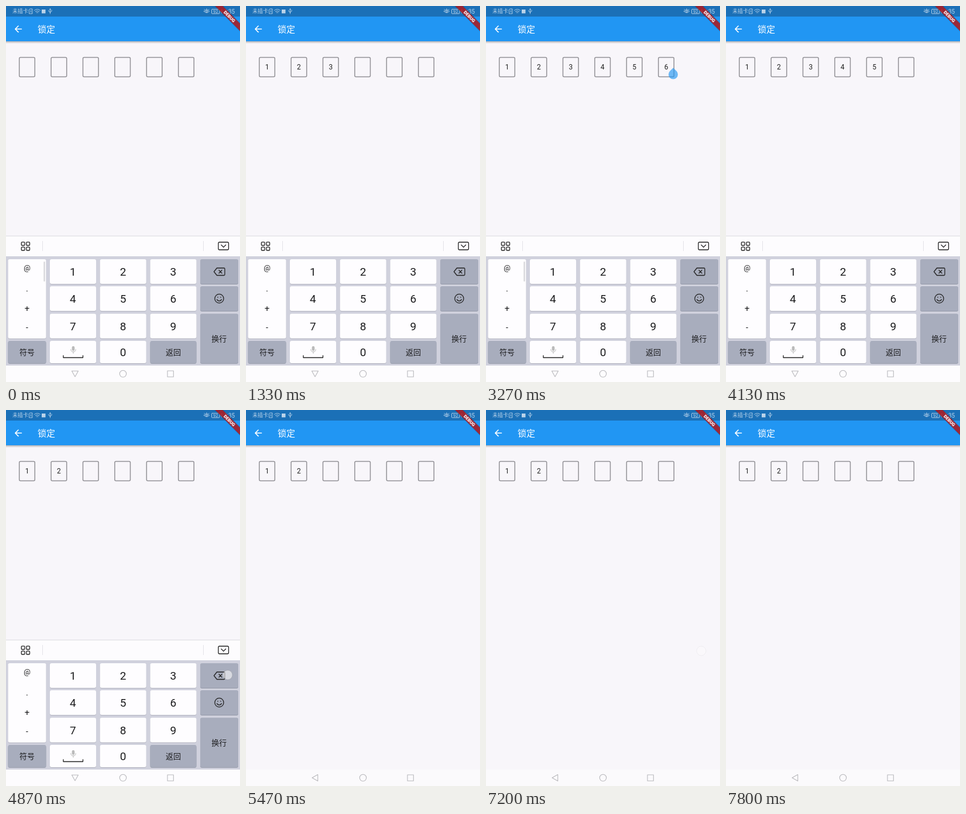
Animation, 400 px wide and 640 px high, one loop 8000 ms. Source, as an HTML page:

```html
<!DOCTYPE html>
<html lang="zh-CN">
<head>
<meta charset="utf-8">
<title>锁定</title>
<style>
html, body { margin: 0; width: 100%; height: 100%; overflow: hidden; background: #f8f6fa; }
svg { display: block; width: 100%; height: 100%; }
text { font-family: Roboto, "Noto Sans CJK SC", "Noto Sans CJK", sans-serif; text-anchor: middle; }
.line { fill: none; stroke-linecap: round; stroke-linejoin: round; }
</style>
</head>
<body>
<svg id="stage" viewBox="0 0 400 640">
  <defs>
    <linearGradient id="shade" x2="0" y2="1">
      <stop stop-color="#000" stop-opacity=".28"/>
      <stop offset="1" stop-color="#000" stop-opacity="0"/>
    </linearGradient>
  </defs>
  <rect width="400" height="640" fill="#f8f6fa"/>
  <rect y="60" width="400" height="4" fill="url(#shade)"/>
  <rect width="400" height="60" fill="#2196f3"/>
  <rect width="400" height="18" fill="#1b70b7"/>

  <g fill="#b9d3ea">
    <text x="24.5" y="12.4" font-size="9">未插卡</text>
    <rect x="61" y="6" width="6.5" height="6.5"/>
    <path d="M368.5 5l-2 4.6h2l-.6 3.6 3-5h-2l1.4-3.2z"/>
    <text x="358.2" y="12" font-size="7.5">92</text>
    <text x="381.5" y="12.6" font-size="10">8:35</text>
  </g>
  <g class="line" stroke="#b9d3ea" stroke-width=".9">
    <path d="M41 5h4v8h-5.500v-6.500zM42.500 7.500v3M48.500 7.500q5-4 10 0M50.300 9.500q3.200-2.500 6.400 0M52.200 11.300q1.300-1 2.600 0M75.500 5v8M73 7.500v1.500l2.500 2 2.500-2v-2M74.500 6l1-1.500 1 1.500"/>
    <path d="M338.500 9q4.500-5 9 0-4.500 5-9 0zM339 5.500l1 1M343 4.500v1M347 5.500l-1 1"/>
    <circle cx="343" cy="9" r="1.500"/>
    <rect x="351.500" y="5.500" width="13.500" height="7.500" rx="1"/>
  </g>

  <path class="line" d="M26.500 39.200H16M21 34l-5.200 5.200 5.200 5.200" stroke="#fff" stroke-width="1.600"/>
  <text x="69" y="45.300" font-size="15" font-weight="500" fill="#fff">锁定</text>

  <g transform="translate(400 0) rotate(45)">
    <rect x="-44" y="20.300" width="88" height="10.400" fill="#000" opacity=".16"/>
    <rect x="-44" y="21" width="88" height="9" fill="#a8202a" opacity=".9"/>
    <text y="28.200" font-size="7.600" font-weight="900" fill="#fff">DEBUG</text>
  </g>

  <g id="boxes"></g>
  <path id="handle" d="M320 105.200l5.660 5.660a8 8 0 1 1-11.320 0z" fill="#2196f3" fill-opacity=".72"/>
  <rect y="612" width="400" height="28" fill="#fbfafc"/>

  <g id="board">
    <rect y="391" width="400" height="249" fill="#fdfcfe"/>
    <path d="M0 391.500H400" stroke="#dcdce0"/>
    <path d="M62.500 400v17M337.500 400v17" stroke="#e3e3e8"/>
    <rect y="426" width="400" height="186" fill="#d0d1dd"/>
    <g id="keys"></g>
    <rect id="bar" x="64.500" y="435" width="2" height="34" rx="1" fill="#d2d2d6"/>
    <g class="line" stroke="#222" stroke-width="1.300">
      <g id="grid"></g>
      <rect x="363" y="402" width="17.500" height="13" rx="2"/>
      <path d="M368 406.800l3.800 3.800 3.800-3.800"/>
      <path d="M360.500 446h12q1.500 0 1.500 1.500v9.500q0 1.500-1.500 1.500h-12l-5-6.250zM364 449.800l5 5M369 449.800l-5 5"/>
      <circle cx="364.500" cy="498" r="7.600"/>
      <path d="M360.500 499.800q4 4.600 8 0M362 495.400v.6M367 495.400v.6"/>
      <path d="M98 594.500v4h33.500v-4" stroke-linecap="butt"/>
    </g>
    <rect x="112.700" y="579" width="4.600" height="8" rx="2.300" fill="#bbb"/>
    <path class="line" d="M110.800 584.500q0 4.200 4.200 4.200t4.200-4.200M115 588.700v2.800" stroke="#bbb"/>
  </g>

  <g class="line" stroke="#b9b9bd" stroke-width="1.100">
    <path id="back" d="M112.500 621.300h11l-5.500 9.700z"/>
    <circle cx="200" cy="626" r="5.700"/>
    <rect x="276" y="621" width="10.300" height="10.300"/>
  </g>
  <circle id="touch" r="8" fill="#fff" fill-opacity=".55" stroke="#777" stroke-opacity=".32" stroke-width=".8"/>
</svg>
<script>
const LOOP = 8000;
const $ = id => document.getElementById(id);
const clamp = v => Math.max(0, Math.min(1, v));

function add(parent, tag, attrs, label) {
  const el = document.createElementNS("http://www.w3.org/2000/svg", tag);
  for (const k in attrs) el.setAttribute(k, attrs[k]);
  if (label !== undefined) el.textContent = label;
  parent.appendChild(el);
  return el;
}

const digits = Array.from({ length: 6 }, (_, i) => {
  const x = 22.7 + i * 54.4;
  add($("boxes"), "rect", { x, y: 87.4, width: 26.6, height: 33.2, rx: 2, fill: "none", stroke: "#929196", "stroke-width": 1.5 });
  return add($("boxes"), "text", { x: x + 13.3, y: 108.2, "font-size": 12, fill: "#222" }, i + 1);
});

function key(x, y, width, height, dark) {
  const box = { x, y, width, height, rx: 3 };
  add($("keys"), "rect", { ...box, y: y + 1, fill: dark ? "#969baa" : "#b3b4c0" });
  add($("keys"), "rect", { ...box, fill: dark ? "#a8adbd" : "#fefdff" });
}
const label = (x, y, size, s) => add($("keys"), "text", { x, y, "font-size": size, fill: "#1c1c1e" }, s);

const cols = [75, 160.7, 246.5], rows = [431, 477, 523.7];
key(3.5, 431, 65, 135);
key(3.5, 570, 65, 38, true);
rows.forEach((y, r) => cols.forEach((x, c) => {
  key(x, y, 79, 42);
  label(x + 39.3, y + 27.8, 19, r * 3 + c + 1);
}));
cols.forEach((x, c) => key(x, 570, 79, 38, c === 2));
key(332, 431, 65, 42, true);
key(332, 477, 65, 42, true);
key(332, 523.7, 65, 84.3, true);
label(200, 596, 19, "0");
label(36, 594, 13, "符号");
label(286, 594, 13, "返回");
label(364.3, 571, 13, "换行");
label(36, 450, 13, "@");
label(36, 485.5, 15, ".");
label(36, 520, 15, "+");
label(36, 552, 14, "-");
for (const x of [26.3, 34.8]) for (const y of [401.8, 410.3])
  add($("grid"), "rect", { x, y, width: 5.7, height: 5.7, rx: 1.2 });

// [time, number of filled boxes]
const edits = [[0, 0], [330, 1], [800, 2], [1200, 3], [1600, 4], [1870, 5], [2130, 6],
  [4000, 5], [4270, 4], [4530, 3], [4800, 2]];
// [keyboard opens, closes]
const spans = [[-400, 2265], [3095, 5265], [6230, 7195]];
// [down, up, x, y]
const taps = [[200, 330, 117, 456], [665, 800, 203, 456], [1065, 1200, 287, 455],
  [1525, 1600, 117, 498], [1795, 1870, 203, 498], [2065, 2190, 284, 496],
  [2865, 3110, 310, 108.5], [3865, 4000, 379, 451], [4135, 4270, 379, 451],
  [4400, 4530, 379, 451], [4730, 4870, 379, 451], [5065, 5190, 118, 631],
  [6065, 6270, 253, 104], [6995, 7120, 368, 410], [7525, 7665, 261, 87]];

function draw(t) {
  const count = edits.filter(e => e[0] <= t).pop()[1];
  digits.forEach((d, i) => d.setAttribute("visibility", i < count ? "visible" : "hidden"));

  const span = spans.find(([a, b]) => t >= a && t < b);
  const age = span ? t - span[0] : 0;
  const p = clamp(age / 170);
  $("board").setAttribute("opacity", span ? clamp(p * 1.3) : 0);
  $("board").setAttribute("transform", `translate(0 ${85 * (1 - p) ** 2})`);
  $("bar").setAttribute("opacity", 1 - clamp((age - 620) / 200));

  const down = span && t < span[1] - 67;
  $("back").setAttribute("transform", `rotate(${down ? 0 : 90} 118 626)`);

  const held = span && span[0] > 0 && !(t >= 4000 && t < 6000);
  $("handle").setAttribute("opacity", held ? clamp((age - 40) / 150) : 0);

  const tap = taps.find(([a, b]) => t >= a && t < b + 110);
  $("touch").setAttribute("opacity", tap ? 1 - clamp((t - tap[1]) / 110) : 0);
  if (tap) $("touch").setAttribute("transform", `translate(${tap[2]} ${tap[3]})`);
}

let start;
function tick(now) {
  start ??= now;
  draw((now - start) % LOOP);
  requestAnimationFrame(tick);
}
draw(0);
requestAnimationFrame(tick);
</script>
</body>
</html>
```
